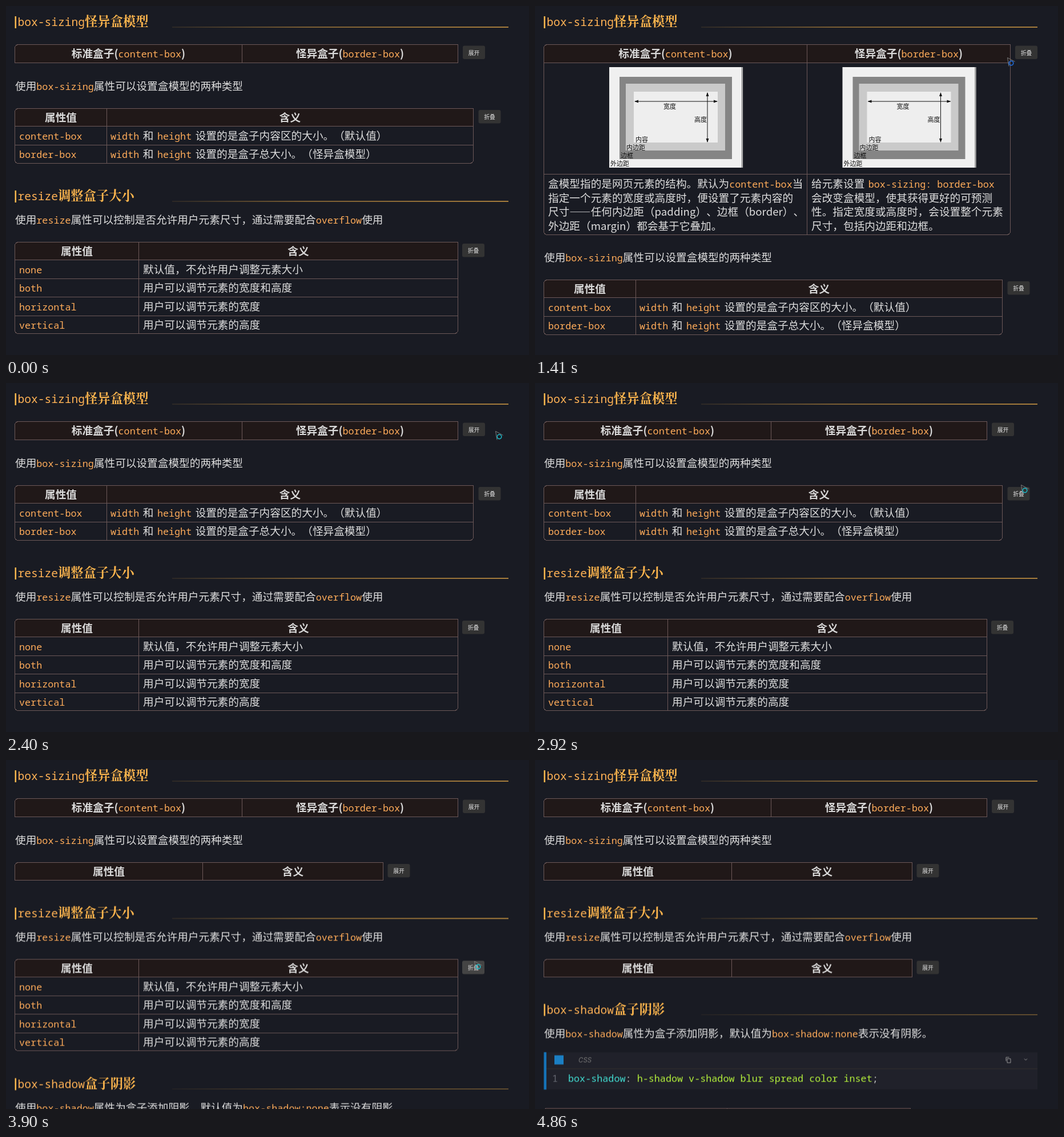
Recreate the animation shown at these times as an HTML page. Size 916 by 611 pixels, loop 5.58 s.

```html
<!DOCTYPE html>
<html lang="zh-CN">
<head>
<meta charset="utf-8">
<title>Box model notes</title>
<style>
html, body { margin: 0; width: 100%; height: 100%; overflow: hidden; background: #191b23; }
svg { display: block; width: 916px; height: 611px; }
text {
  font: 500 18.67px "Noto Sans CJK SC", "Noto Sans CJK", sans-serif;
  fill: #dedede; word-spacing: 2.3px; text-spacing-trim: space-all;
}
.code { font: 16.75px "Noto Sans Mono", monospace; fill: #ffac5a; word-spacing: 0; }
.th { font-weight: 700; fill: #d9d9d9; text-anchor: middle; }
.title { font: 600 22.3px "Noto Serif CJK SC", "Noto Sans CJK SC", serif; fill: #ffb74e; }
.title .code { font-size: 19.6px; fill: #ffb255; }
.label { font-size: 11px; font-weight: 400; fill: #111; }
.btn { font-size: 9.8px; fill: #e4e4e4; text-anchor: middle; }
.line { fill: none; stroke: #6c5858; }
.line, .rule { shape-rendering: crispEdges; }
.head { fill: #201818; }
.key { fill: #42ddd2; } .val { fill: #b5f23c; } .punct { fill: #c8c8c8; } .num { fill: #666972; }

[class^="s-"] { animation: 5580ms step-end infinite; }
.s-open1 { animation-name: open1; }
.s-closed1 { animation-name: closed1; }
.s-below1 { animation-name: below1; }
.s-open2 { animation-name: open2; }
.s-closed2 { animation-name: closed2; }
.s-below2 { animation-name: below2; }
.s-open3 { animation-name: open3; }
.s-closed3 { animation-name: closed3; }
.s-below3 { animation-name: below3; }
.s-hover1 { animation-name: hover1; }
.s-hover1b { animation-name: hover1b; }
.s-hover2 { animation-name: hover2; }
.s-hover3 { animation-name: hover3; }
.s-ring { fill: none; stroke-width: 1.5; animation-name: ring; }
@keyframes open1 { 0% { opacity: 0 } 25.269% { opacity: 1 } 43.011% { opacity: 0 } }
@keyframes closed1 { 0% { opacity: 1 } 25.269% { opacity: 0 } 43.011% { opacity: 1 } }
@keyframes below1 { 0% { transform: none } 25.269% { transform: translateY(300px) } 43.011% { transform: none } }
@keyframes open2 { 0% { opacity: 1 } 59.677% { opacity: 0 } }
@keyframes closed2 { 0% { opacity: 0 } 59.677% { opacity: 1 } }
@keyframes below2 { 0% { transform: none } 59.677% { transform: translateY(-64.6px) } }
@keyframes open3 { 0% { opacity: 1 } 76.882% { opacity: 0 } }
@keyframes closed3 { 0% { opacity: 0 } 76.882% { opacity: 1 } }
@keyframes below3 { 0% { transform: none } 76.882% { transform: translateY(-130px) } }
@keyframes hover1 { 0% { fill: #333 } 14.516% { fill: #444 } 25.269% { fill: #333 } }
@keyframes hover1b { 0% { fill: #333 } 29.5% { fill: #414141 } }
@keyframes hover2 { 0% { fill: #333 } 53.226% { fill: #444 } }
@keyframes hover3 { 0% { fill: #333 } 69.892% { fill: #444 } }
@keyframes ring { 0% { stroke: #1f6fe5 } 43.011% { stroke: #1bbccb } }

.pointer { animation: pointer 5580ms ease-in-out infinite, seen 5580ms step-end infinite; }
@keyframes seen { 0% { opacity: 0 } 2.688% { opacity: 1 } 87.097% { opacity: 0 } }
@keyframes pointer {
  0%, 2.688% { transform: translate(600px, 572px) }
  12.545%, 14.516% { transform: translate(828px, 95px) }
  19.176%, 25.269% { transform: translate(827px, 90px) }
  32.975%, 36.38% { transform: translate(855px, 88px) }
  39.427%, 43.011% { transform: translate(857px, 84px) }
  52.33%, 53.226% { transform: translate(851px, 178px) }
  56.81%, 59.677% { transform: translate(855px, 199px) }
  69.176%, 69.892% { transform: translate(820px, 352px) }
  73.835%, 76.882% { transform: translate(824px, 371px) }
  86.022%, 100% { transform: translate(580px, 598px) }
}
</style>
</head>
<body>
<svg id="stage" viewBox="0 0 916 611"></svg>
<script>
const LEFT = 15.5;

// Backticks mark inline code.
const text = (x, y, content, cls = '') =>
  `<text x="${x}" y="${y}" class="${cls}">${content.replace(/`(.+?)`/g, '<tspan class="code">$1</tspan>')}</text>`;

const rect = (x, y, w, h, fill, extra = '') =>
  `<rect x="${x}" y="${y}" width="${w}" height="${h}" fill="${fill}" ${extra}/>`;

const group = (state, ...parts) => `<g class="s-${state}">${parts.join('')}</g>`;

const title = (y, content) =>
  rect(LEFT, y - 10, 2.5, 21, '#ffb74e') +
  text(20.5, y + 7, content, 'title') +
  rect(291, y + 8.2, 589, 1.4, 'url(#fade)', 'class="rule"');

function outline(top, right, bottom, r) {
  return `M${LEFT + 7} ${top}H${right}V${bottom - r}q0 ${r} ${-r} ${r}H${LEFT + r}` +
    `q${-r} 0 ${-r} ${-r}V${top + 7}q0 -7 7 -7z`;
}

// ys holds the top edge and the bottom edge of every row.
function table(ys, split, right, heads) {
  const top = ys[0], bottom = ys[ys.length - 1], open = ys.length > 2;
  const rules = ys.slice(1, -1).map(y => `M${LEFT} ${y}H${right}`).join('');
  const base = (top + ys[1]) / 2 + 6.7;
  return `<path class="head" d="${outline(top, right, ys[1], 0)}"/>` +
    `<path class="line" d="${outline(top, right, bottom, open ? 7 : 0)}M${split} ${top}V${bottom}${rules}"/>` +
    text((LEFT + split) / 2, base, heads[0], 'th') +
    text((split + right) / 2, base, heads[1], 'th');
}

const button = (x, y, label, state = '') =>
  rect(x, y, 39, 23.5, '#333', `rx="3" class="${state && 's-' + state}"`) +
  text(x + 19.5, y + 16, label, 'btn');

function boxDiagram(x) {
  const labels = [[95, 73, '宽度'], [149, 96, '高度'], [46, 131, '内容'],
    [30, 145, '内边距'], [20, 159, '边框'], [2, 173, '外边距']];
  return `<g transform="translate(${x} 107)">` +
    rect(0, 0, 234, 176, '#f0f0f0') + rect(232, 0, 1, 176, '#555') +
    rect(18, 17, 197, 144, '#858585') + rect(29, 29, 174, 117, '#cacaca') +
    rect(43, 43, 147, 89, '#eee') +
    '<path d="M45 60H189M172 45V131" stroke="#111"/>' +
    '<path d="M44 60l7-2.5v5zM190 60l-7-2.5v5zM172 44l-2.5 7h5zM172 132l-2.5-7h5z" fill="#111"/>' +
    labels.map(([lx, ly, s]) => text(lx, ly, s, 'label')).join('') + '</g>';
}

const lines = (x, rows) => rows.map((s, i) => text(x, 318 + i * 24.6, s)).join('');

const boxHeads = ['标准盒子(`content-box`)', '怪异盒子(`border-box`)'];
const valueHeads = ['属性值', '含义'];

const sizingOpen = group('open1',
  table([67.5, 99.5, 294.5, 400.5], 476.5, 832.5, boxHeads),
  button(841, 69.5, '折叠', 'hover1b'),
  boxDiagram(130), boxDiagram(538.5),
  lines(23, ['盒模型指的是网页元素的结构。默认为`content-box`当', '指定一个元素的宽度或高度时，便设置了元素内容的',
    '尺寸——任何内边距（padding）、边框（border）、', '外边距（margin）都会基于它叠加。']),
  lines(484, ['给元素设置 `box-sizing: border-box`', '会改变盒模型，使其获得更好的可预测',
    '性。指定宽度或高度时，会设置整个元素', '尺寸，包括内边距和边框。']));

const sizingClosed = group('closed1',
  table([67.5, 99.5], 413.5, 791.5, boxHeads),
  button(800, 69.5, '展开', 'hover1'));

const valuesOpen = group('open2',
  table([179.5, 210.5, 243.5, 275.5], 176.5, 818.5, valueHeads),
  button(827.5, 182, '折叠', 'hover2'),
  text(23, 233.5, '`content-box`'),
  text(183, 233.5, '`width` 和 `height` 设置的是盒子内容区的大小。（默认值）'),
  text(23, 266, '`border-box`'),
  text(183, 266, '`width` 和 `height` 设置的是盒子总大小。（怪异盒模型）'));

const closedTable = (state, top) => group(state,
  table([top, top + 31], 344.5, 660.5, valueHeads),
  button(668.5, top + 2.5, '展开'));

const resizeRows = [['none', '默认值，不允许用户调整元素大小'], ['both', '用户可以调节元素的宽度和高度'],
  ['horizontal', '用户可以调节元素的宽度'], ['vertical', '用户可以调节元素的高度']];
const resizeOpen = group('open3',
  table([413.5, 444.5, 477.5, 509.5, 542.5, 573.5], 232.5, 791.5, valueHeads),
  button(799, 416, '折叠', 'hover3'),
  ...resizeRows.map(([name, meaning], i) =>
    text(23, 468 + i * 32.3, '`' + name + '`') + text(240, 468 + i * 32.3, meaning)));

const shadowSection = '<g transform="translate(0 194.6)">' +
  title(437, '`box-shadow`盒子阴影') +
  text(16, 485, '使用`box-shadow`属性为盒子添加阴影，默认值为`box-shadow:none`表示没有阴影。') +
  rect(LEFT, 511.5, 864.5, 65.5, '#20212a') + rect(LEFT, 511.5, 4.5, 65.5, '#1572b6') +
  rect(20, 540, 860, 1, '#35322f') + rect(34, 517, 16, 16, '#1b7fc3') +
  '<text x="76" y="529" style="font:italic 11.5px Inter,sans-serif;fill:#777">CSS</text>' +
  '<path d="M827 523h6v7h-6zM825 527v-6.5h5.5M857 523l2.5 2.5 2.5-2.5" fill="none" stroke="#999"/>' +
  '<text x="30" y="563" class="code"><tspan class="num">1</tspan></text>' +
  '<text x="58" y="563" class="code"><tspan class="key">box-shadow</tspan><tspan class="punct">:</tspan>' +
  '<tspan class="val"> h-shadow v-shadow blur spread color inset</tspan><tspan class="punct">;</tspan></text>' +
  table([609.5, 640.5], 336.5, 657.5, valueHeads) + '</g>';

document.getElementById('stage').innerHTML = `
  <defs><linearGradient id="fade">
    <stop stop-color="#9c7539" stop-opacity=".15"/><stop offset=".4" stop-color="#9c7539" stop-opacity=".75"/>
    <stop offset="1" stop-color="#a67d3c"/>
  </linearGradient></defs>` +
  title(28, '`box-sizing`怪异盒模型') + sizingClosed + sizingOpen +
  group('below1',
    text(16, 147, '使用`box-sizing`属性可以设置盒模型的两种类型'),
    valuesOpen, closedTable('closed2', 179.5),
    group('below2',
      title(333, '`resize`调整盒子大小'),
      text(16, 381, '使用`resize`属性可以控制是否允许用户元素尺寸，通过需要配合`overflow`使用'),
      resizeOpen, closedTable('closed3', 413.5),
      group('below3', shadowSection))) +
  `<g class="pointer">
    <path d="M3 15.5L.5 .5 13.5 7.5" fill="none" stroke="#7d7d7d"/>
    <circle class="s-ring" cx="7" cy="10" r="3.8"/>
  </g>`;
</script>
</body>
</html>
```
